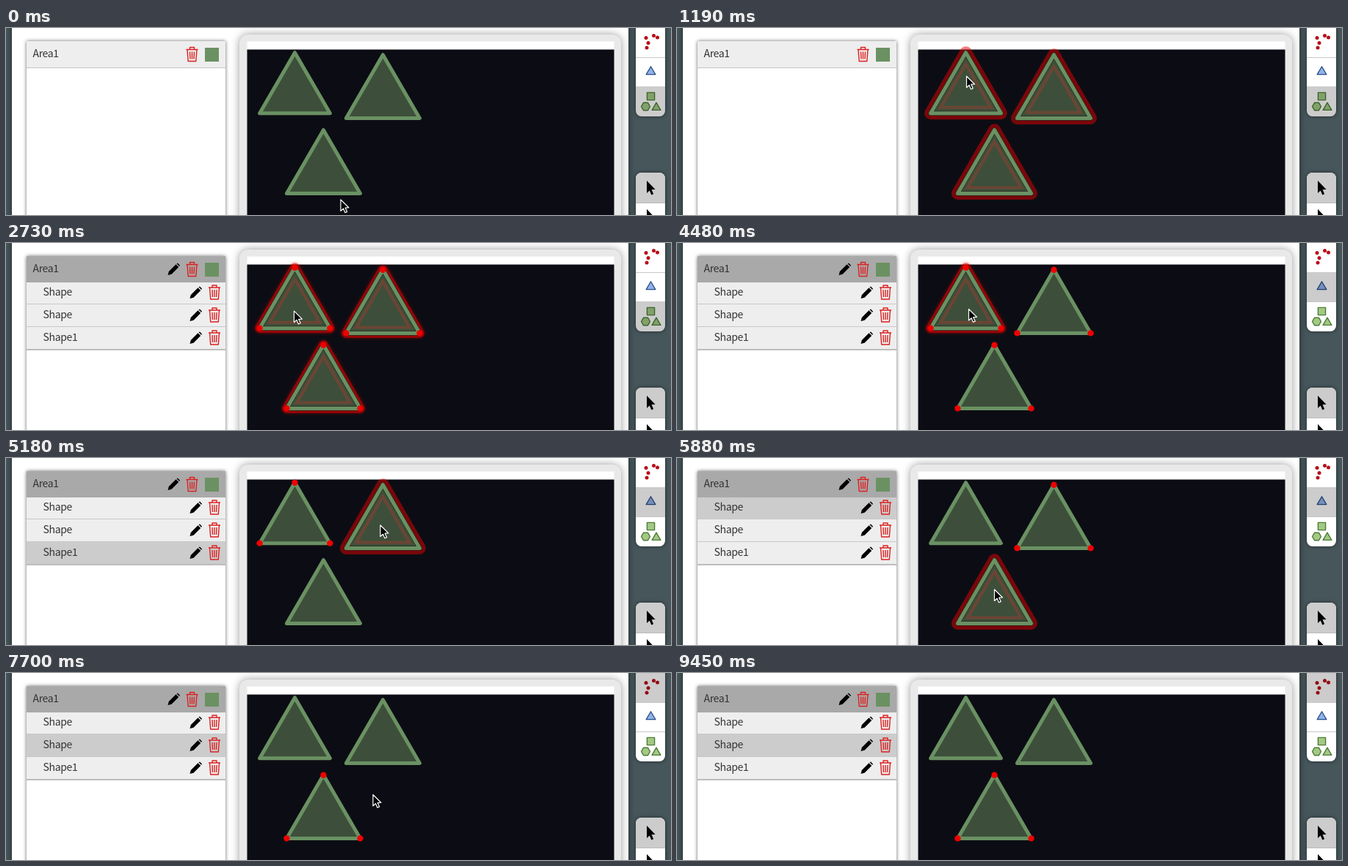
Animation, 906 px wide and 256 px high, one loop 9940 ms. Source, as an HTML page with a canvas:

```html
<!DOCTYPE html>
<html lang="en">
<head>
<meta charset="utf-8">
<title>Area selection</title>
<style>
html, body { margin: 0; width: 100%; height: 100%; overflow: hidden; }
canvas { display: block; }
</style>
</head>
<body>
<canvas id="stage" width="906" height="256"></canvas>
<script>
const ctx = document.getElementById('stage').getContext('2d');
const LOOP = 9940, STEP = 70, GLIDE = 560;
const POINTS = 0, SHAPES = 1, AREAS = 2;
const NONE = -1, ALL = 3;
const FILL = '#3d4f3a', GREEN = '#6a9163';

// What the user does, in order of time
const script = [
  { at: -GLIDE, to: [456, 235], tool: AREAS, select: NONE },
  { at: 350, to: [394.5, 66] },
  { at: 1190, to: [390.5, 93.5] },
  { at: 2100, select: ALL },
  { at: 2660, to: [436.5, 84] },
  { at: 3710, to: [397.5, 90.5], tool: SHAPES },
  { at: 4550, to: [510, 92], select: 0 },
  { at: 5320, to: [432.5, 180], select: 1 },
  { at: 6370, to: [500, 166.5], select: 2 },
  { at: 7070, tool: POINTS },
  { at: 8680, to: [455, 260] }
];

const clamp = v => Math.max(0, Math.min(1, v));
const smooth = v => v * v * (3 - 2 * v);
const mix = (a, b, k) => a + (b - a) * k;
const grey = v => `rgb(${v},${v},${v})`;

// Latest value of a property, the one before it, and the eased progress between them
function latest(key, t) {
  const past = script.filter(step => key in step && step.at <= t);
  const last = past.pop(), before = past.pop() || last;
  return { now: last[key], before: before[key], k: smooth(clamp((t - last.at) / GLIDE)) };
}

function activity({ now, before, k }, value) {
  return mix(+(before === value), +(now === value), k);
}

function polygon(points) {
  const path = new Path2D();
  points.forEach(([x, y]) => path.lineTo(x, y));
  path.closePath();
  return path;
}

// Corners of a regular polygon, first corner at the given angle in degrees
function regular(sides, x, y, radius, angle = -90) {
  return Array.from({ length: sides }, (_, i) => {
    const a = (angle + 360 * i / sides) * Math.PI / 180;
    return [x + radius * Math.cos(a), y + radius * Math.sin(a)];
  });
}

const shapes = [
  regular(3, 393.5, 89, 55.3),
  regular(3, 513.5, 94.5, 57.8),
  regular(3, 432.5, 197.5, 57.8)
].map(corners => ({ corners, path: polygon(corners) }));
const rowOfShape = [2, 0, 1];

const arrow = new Path2D('M0 0V15.5L3.6 12.2L6 17.8L8.7 16.6L6.2 11.2L11 11Z');
const trashPath = new Path2D('M-8-6.5H8M-3-6.5V-9.5H3V-6.5M-6.5-6.5L-5.3 9.5H5.3L6.5-6.5M-3-3.5L-2.5 6.5M0-3.5V6.5M3-3.5L2.5 6.5');
const pencilPath = new Path2D('M-8 8L-6.7 3L3-6.7L6.7-3L-3 6.7ZM4-7.7L5.5-8.4L8.4-5.5L7.7-4Z');

function rect(x, y, w, h, color) {
  ctx.fillStyle = color;
  ctx.fillRect(x, y, w, h);
}

function fill(path, color) {
  ctx.fillStyle = color;
  ctx.fill(path);
}

function stroke(path, color, width) {
  ctx.strokeStyle = color;
  ctx.lineWidth = width;
  ctx.stroke(path);
}

function isolated(draw, x = 0, y = 0) {
  ctx.save();
  ctx.translate(x, y);
  draw();
  ctx.restore();
}

function rounded(x, y, w, h, radius) {
  const path = new Path2D();
  path.roundRect(x, y, w, h, radius);
  return path;
}

function raised(path, color, blur, shadow = '#0008') {
  isolated(() => {
    ctx.shadowBlur = blur;
    ctx.shadowColor = shadow;
    fill(path, color);
  });
}

function dot([x, y], r, color) {
  ctx.fillStyle = color;
  ctx.beginPath();
  ctx.arc(x, y, r, 0, 7);
  ctx.fill();
}

function text(string, x, y) {
  ctx.font = '14px "Noto Sans CJK JP", "Noto Sans", sans-serif';
  ctx.letterSpacing = '-0.35px';
  ctx.fillStyle = '#333';
  ctx.fillText(string, x, y);
}

const trash = (x, y) => isolated(() => stroke(trashPath, '#dc2020', 1.4), x, y);
const pencil = (x, y) => isolated(() => fill(pencilPath, '#000'), x, y);

function drawPage() {
  rect(0, 0, 906, 256, '#46565b');
  raised(rounded(8, -20, 840, 300, 8), '#fff', 8);
  raised(rounded(318, 9, 520, 270, 12), '#e9e9e9', 12, '#999');
  rect(328.5, 18.5, 500, 11, '#fff');
  rect(328.5, 29.5, 500, 227, '#0c0d14');
}

function drawPanel(t) {
  const selection = latest('select', t);
  const open = selection.before === NONE ? selection.k : 1;
  const expanded = selection.now !== NONE;
  raised(rounded(28, 18, 271, 260, 1), '#fff', 5, '#0009');
  rect(28, 18, 271, 36, grey(expanded ? mix(238, 169, open) : 238));
  text('Area1', 36.5, 39.5);
  trash(253.5, 36);
  rect(271, 27, 19, 19, '#6b9162');
  if (!expanded) return rect(28, 54, 271, 1, '#c4c4c4');

  pencil(228.5, 36);
  const height = 91 * open;
  isolated(() => {
    ctx.clip(rounded(28, 54, 271, height, 0));
    ['Shape', 'Shape', 'Shape1'].forEach((label, i) => {
      const y = 53 + 31 * i;
      rect(28, y, 271, 31, grey(mix(238, 204, activity(selection, rowOfShape.indexOf(i)))));
      rect(28, y + 30, 271, 1, '#c8c8c8');
      text(label, 50.5, y + 18.5);
      pencil(258.5, y + 15);
      trash(284, y + 14.5);
    });
  });
  rect(28, 54 + height, 271, 2, '#bdbdbd');
}

function drawGlow(path, selected) {
  isolated(() => {
    if (selected) {
      ctx.shadowColor = 'rgba(210,0,0,.8)';
      ctx.shadowBlur = 5;
    }
    stroke(path, 'rgba(230,0,0,.5)', selected ? 13 : 17);
  });
  isolated(() => {
    ctx.clip(path);
    fill(path, FILL);
    stroke(path, '#6b4534', 20);
    stroke(path, FILL, 12);
  });
  stroke(path, '#2b2a1e', 6.5);
}

function drawShape({ path, corners }, hovered, selected) {
  ctx.lineJoin = 'round';
  fill(path, FILL);
  if (hovered) drawGlow(path, selected);
  stroke(path, GREEN, 5);
  if (selected) corners.forEach(corner => dot(corner, 4.2, '#f00000'));
}

function drawToolIcons() {
  [[872, 13.5], [882.5, 10.5], [887.5, 13], [875, 20.5], [873, 27]]
    .forEach(point => dot(point, 2.5, '#b80d18'));
  const triangle = polygon(regular(3, 878.5, 60, 7.3));
  fill(triangle, '#8fb3ea');
  stroke(triangle, '#2b4d86', 1.3);
  [regular(4, 878.5, 93.5, 7.2, 45), regular(6, 871.5, 107.5, 6, 0), regular(3, 886, 109, 6.8)]
    .map(polygon).forEach(path => {
      fill(path, '#a4c884');
      stroke(path, '#4b7d36', 1.4);
    });
}

function drawToolbar(t) {
  const tool = latest('tool', t), bar = rounded(858, -12, 40, 133, 8);
  raised(bar, '#fff', 5);
  drawToolIcons();
  isolated(() => {
    ctx.clip(bar);
    for (let i = 0; i < 3; i++) {
      const y = 40 * i;
      rect(858, y, 40, 41, `rgba(0,0,0,${0.2 * activity(tool, i)})`);
      if (i) rect(858, y, 40, 1, '#c8c8c8');
    }
  });

  raised(rounded(858, 198, 40, 80, 8), '#fff', 5);
  fill(rounded(858, 198, 40, 42, [8, 8, 0, 0]), '#ccc');
  rect(858, 239, 40, 1, '#bbb');
  for (const y of [209, 248]) {
    isolated(() => {
      ctx.scale(1.05, 1.1);
      fill(arrow, '#000');
    }, 873, y);
  }
}

function drawFrame(t) {
  const pointer = latest('to', t);
  const [x, y] = pointer.now.map((v, i) => mix(pointer.before[i], v, pointer.k));
  const under = shapes.findIndex(({ path }) => ctx.isPointInPath(path, x, y));
  const tool = latest('tool', t).now, selection = latest('select', t).now;
  drawPage();
  drawPanel(t);
  shapes.forEach((shape, i) => {
    const hovered = tool === AREAS ? under >= 0 : tool === SHAPES && under === i;
    drawShape(shape, hovered, selection === ALL || selection === i);
  });
  drawToolbar(t);
  isolated(() => {
    fill(arrow, '#000');
    stroke(arrow, '#fff', 1.2);
  }, x, y);
}

function tick() {
  const t = performance.now() % LOOP;
  drawFrame(Math.floor(t / STEP) * STEP);
  requestAnimationFrame(tick);
}
tick();
</script>
</body>
</html>
```
